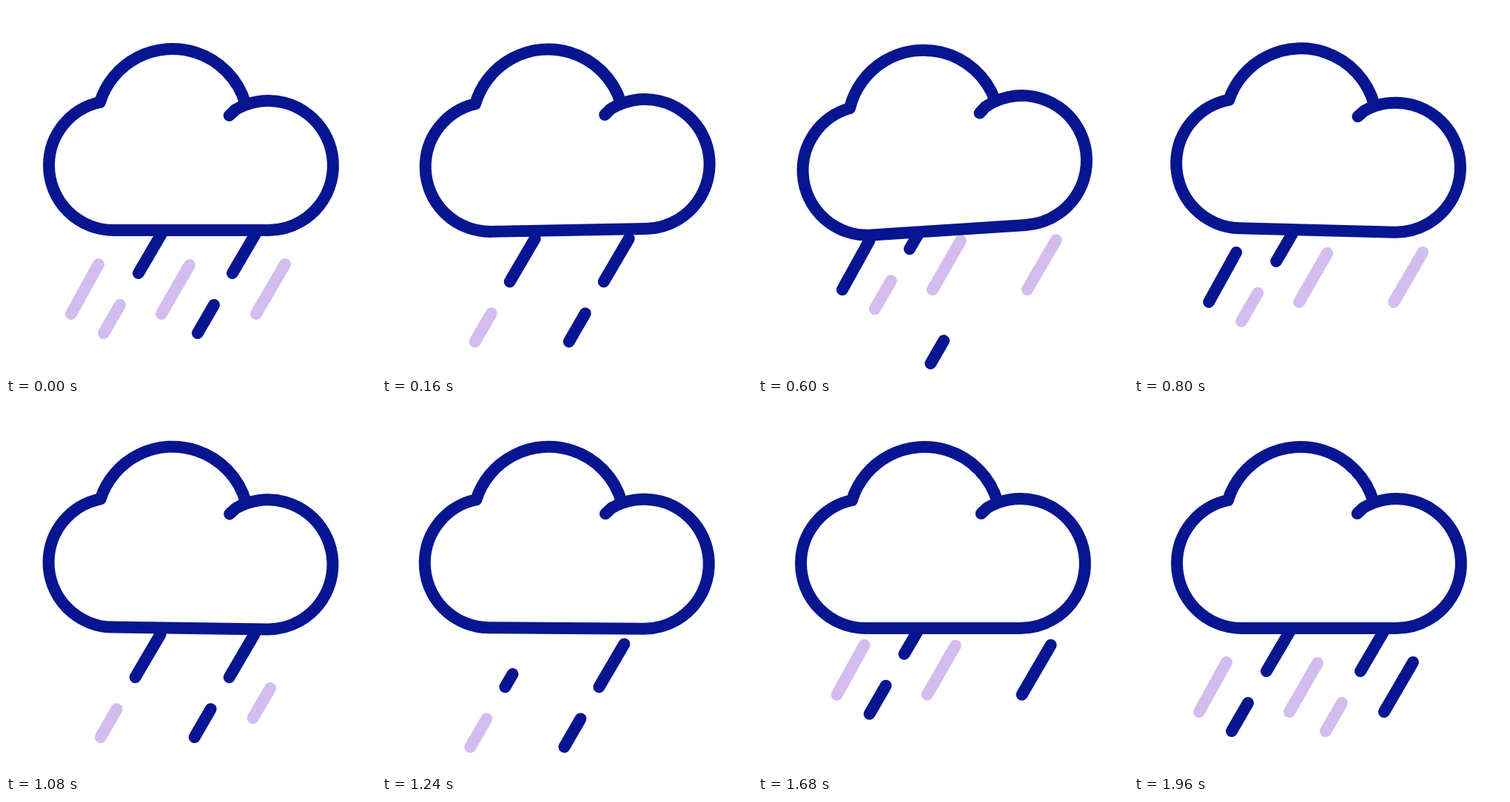
Write an HTML page with a canvas that moves like this. It is 500 px wide and 500 px high and loops after 2000 ms.

```html
<!DOCTYPE html>
<html lang="en">
<head>
<meta charset="utf-8">
<title>Rain cloud</title>
<style>
  html, body { margin: 0; width: 100%; height: 100%; overflow: hidden; background: #fff; }
  canvas { display: block; width: 500px; height: 500px; }
</style>
</head>
<body>
<canvas id="stage" width="500" height="500"></canvas>
<script>
const ctx = document.getElementById('stage').getContext('2d');
const LOOP = 2000, STEP = 40, LAST = 1960;
const CYCLE = 980, FALL = 81, FLOOR = 483;
const NAVY = '#081591', LILAC = '#d3bdef';

// x, y: lower end at rest; w, h: extent; start, fade: in and out times
// relative to the rest pose; tint: one colour letter per cycle.
const drops = [
  { x: 88,  y: 416, w: 37, h: 67, start: -700, fade: 0,   tint: 'LNL' },
  { x: 210, y: 416, w: 38, h: 66, start: -655, fade: 0,   tint: 'LLL' },
  { x: 338, y: 416, w: 39, h: 67, start: -540, fade: 60,  tint: 'LLN' },
  { x: 179, y: 361, w: 34, h: 58, start: -500, fade: 190, tint: 'NNN' },
  { x: 306, y: 361, w: 34, h: 58, start: -150, fade: 450, tint: 'NNN' },
  { x: 132, y: 442, w: 22, h: 38, start: -490, fade: 300, tint: 'LLN' },
  { x: 259, y: 442, w: 22, h: 38, start: -140, fade: 610, tint: 'NNL' }
];

const fallKeys = [[0, 0], [320, 23], [600, 48.3], [800, 65], [1080, 89.3], [1400, 115.5], [1960, 162]];
const clamp = v => Math.max(0, Math.min(1, v));
const ease = p => (1 - Math.cos(Math.PI * p)) / 2;

function along(keys, t) {
  let i = 1;
  while (i < keys.length - 1 && t > keys[i][0]) i++;
  const [t0, v0] = keys[i - 1], [t1, v1] = keys[i];
  return v0 + (v1 - v0) * clamp((t - t0) / (t1 - t0));
}

function tilt(t) {
  if (t < 585) return -3.8 * t / 585;
  if (t < 790) return -3.8 + 5.3 * ease((t - 585) / 205);
  return 1.5 * (1 - clamp((t - 790) / 590));
}

// Sideways drift: the fall is slanted, a little more so at its start.
const drift = s => (s ? 1 : 0) - s * (s < 0 ? 0.76 : 0.64);

function drawDrop(d, cycle, t) {
  const age = t - cycle * CYCLE;
  const s = along(fallKeys, t) - cycle * FALL;
  const x = d.x + drift(s), y = d.y + s;
  const from = clamp((age - d.fade) / 100);
  const to = Math.min(clamp((age - d.start) / 100), 1 - Math.max(0, y - FLOOR) / d.h);
  if (to <= from) return;
  ctx.strokeStyle = d.tint[cycle] === 'N' ? NAVY : LILAC;
  ctx.beginPath();
  for (const q of [from, to]) ctx.lineTo(x + d.w * (1 - q), y - d.h * (1 - q));
  ctx.stroke();
}

function drawCloud(angle) {
  const r = 87.5, left = 145.5, right = 354.5, mid = 215.5, base = mid + r;
  const topX = 225, topY = 160.7;
  ctx.save();
  ctx.translate(250, 180);
  ctx.rotate(angle * Math.PI / 180);
  ctx.translate(-250, -180);
  ctx.beginPath();
  ctx.moveTo(right, base);
  ctx.lineTo(left, base);
  ctx.arc(left, mid, r, Math.PI / 2, Math.atan2(130 - mid, 127 - left));
  ctx.arc(topX, topY, 102.7, Math.atan2(130 - topY, 127 - topX), Math.atan2(132 - topY, 324 - topX));
  ctx.moveTo(301.7, 148);
  ctx.arc(right, mid, r, Math.atan2(140 - mid, 310 - right), Math.PI / 2);
  ctx.lineTo(left, base);
  ctx.fillStyle = '#fff';
  ctx.fill();
  ctx.strokeStyle = NAVY;
  ctx.stroke();
  ctx.restore();
}

function draw(t) {
  ctx.fillStyle = '#fff';
  ctx.fillRect(0, 0, 500, 500);
  ctx.lineWidth = 16;
  ctx.lineCap = ctx.lineJoin = 'round';
  for (const d of drops)
    for (let cycle = 0; cycle < 3; cycle++) drawDrop(d, cycle, t);
  drawCloud(tilt(t));
}

const begin = performance.now();
function tick() {
  const t = (performance.now() - begin) % LOOP;
  draw(Math.min(LAST, Math.floor(t / STEP) * STEP));
  requestAnimationFrame(tick);
}
tick();
</script>
</body>
</html>
```
